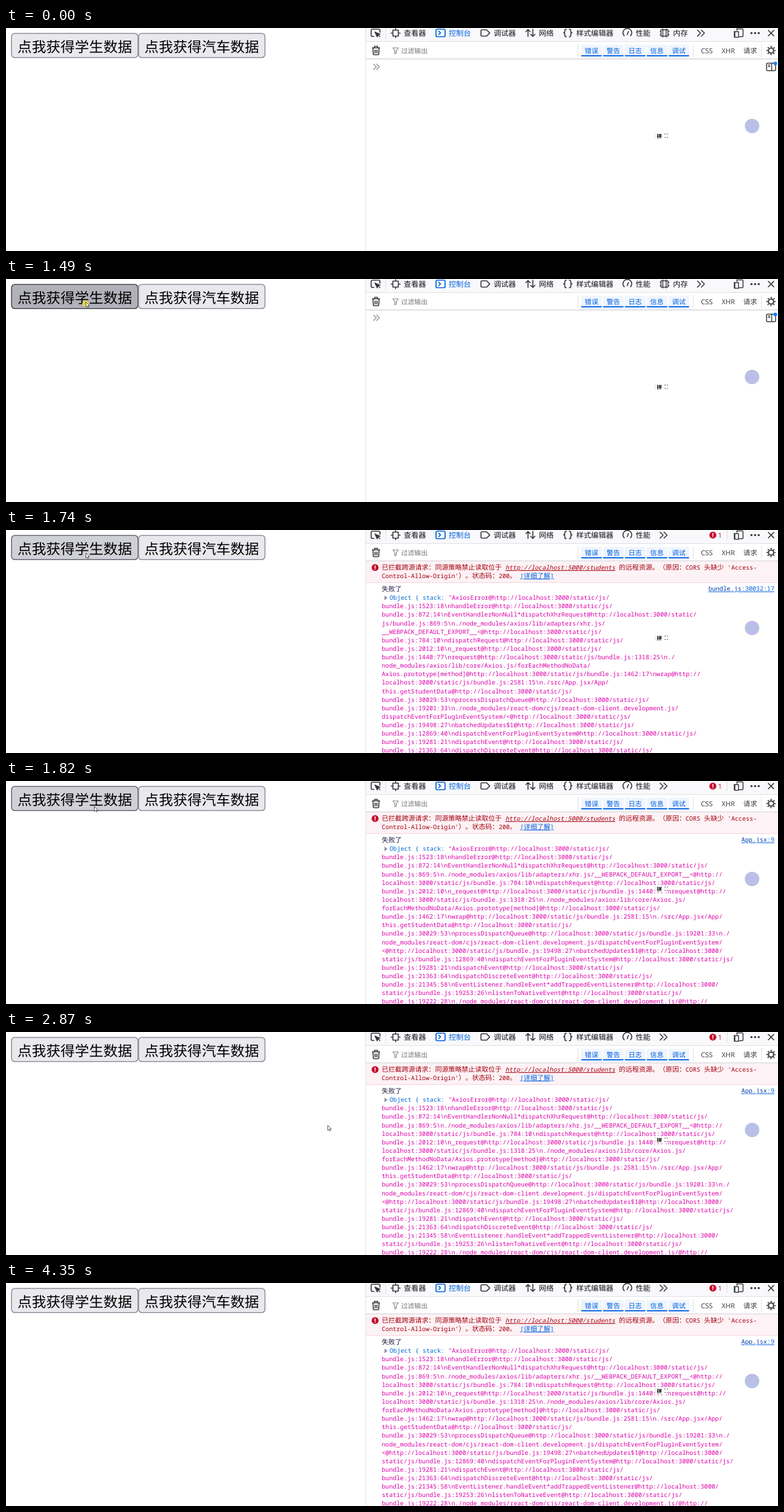
Recreate the animation shown at these times as an HTML page. Size 1280 by 371 pixels, loop 4.44 s.

```html
<!DOCTYPE html>
<html lang="zh-CN">
<head>
<meta charset="utf-8">
<title>控制台</title>
<style>
html, body { margin: 0; width: 100%; height: 100%; overflow: hidden; background: #fff; }
svg { display: block; width: 100%; height: 100%; }
text { white-space: pre; text-rendering: geometricPrecision; text-spacing-trim: space-all; }
.ui { font-family: "Open Sans", "Noto Sans CJK SC", "Noto Sans CJK", sans-serif; }
.mono { font: 500 10.13px "Noto Sans Mono", monospace; }
.cjk { font: 400 11.06px "Noto Sans CJK SC", "Noto Sans CJK", sans-serif; }
.icon { fill: none; stroke: #38383d; stroke-width: 1.7; stroke-linecap: round; stroke-linejoin: round; }
.link { text-decoration: underline; }
</style>
</head>
<body>
<svg viewBox="0 0 1280 371" preserveAspectRatio="none">
  <g id="buttons"></g>

  <rect x="597" width="683" height="22" fill="#f9f9fb"/>
  <path d="M596.5 0V371M597 22.5H1280M629.5 0V19M948.5 27V48M1139.5 27V48M1252.5 27V48" stroke="#e0e0e2"/>
  <path d="M597 51.5H1280" stroke="#d7d7db" stroke-width="1.3"/>

  <g class="icon">
    <path d="M610 14H607.5A2 2 0 0 1 605.5 12V4A2 2 0 0 1 607.5 2H618A2 2 0 0 1 620 4V7"/>
    <path d="M611.5 6.5L620.5 10.3 617 11.5 615.5 15ZM617 11.5L620 14.5" fill="#38383d" stroke-width="1.2"/>
    <path d="M641.5 3.5H650.5V13.5H641.5ZM646 1V3M646 14V16M638.5 8.5H641M651 8.5H653.5"/>
    <path d="M715 2H726A2 2 0 0 1 728 4V12.5A2 2 0 0 1 726 14.5H715A2 2 0 0 1 713 12.5V4A2 2 0 0 1 715 2ZM717.5 5.5L720.5 8.2 717.5 11" stroke="#0060df"/>
    <path d="M789 3H797L802 8.3 797 13.5H789A1.5 1.5 0 0 1 787.5 12V4.500A1.500 1.500 0 0 1 789 3Z"/>
    <path d="M865.500 14V2.500M862 6L865.500 2.500 869 6M873.500 2V14M870 10.500L873.500 14 877 10.500"/>
    <path d="M929 2Q926.500 2 926.500 4.500V6Q926.500 8 924.500 8 926.500 8 926.500 10V12Q926.500 14.500 929 14.500M934 2Q936.500 2 936.500 4.500V6Q936.500 8 938.500 8 936.500 8 936.500 10V12Q936.500 14.500 934 14.500"/>
    <path d="M1025 13A7.300 7.300 0 1 1 1035.500 13M1030 11L1032 6"/>
    <path d="M1207.500 15V5.500M1211.500 1.500H1220.500A1.500 1.500 0 0 1 1222 3V13A1.500 1.500 0 0 1 1220.500 14.500H1216M1212 4V1.500M1208.500 6H1214.500V15.500H1208.500Z" stroke-width="1.500"/>
    <path d="M1236 8.500H1236.100M1242 8.500H1242.100M1248 8.500H1248.100" stroke-width="3.600"/>
    <path d="M1264 4L1273 13M1273 4L1264 13"/>
    <path d="M607.500 33H619.500M611 32.500V30.500H616V32.500M608.500 33.500L609 43A1.500 1.500 0 0 0 610.500 44.500H616.500A1.500 1.500 0 0 0 618 43L618.500 33.500M612 36.500V41.500M615 36.500V41.500"/>
    <path d="M641.500 33H650.500L647.300 37.500V41.500L644.700 43V37.500Z" stroke="#85858c" stroke-width="1.200"/>
    <circle cx="1268.500" cy="37.500" r="4.300" stroke-width="2.100"/>
    <circle cx="1268.500" cy="37.500" r="6.700" stroke-width="2" stroke-linecap="butt" stroke-dasharray="2.100 3.162" stroke-dashoffset="1.050"/>
  </g>
  <g id="labels" class="ui" font-size="12.300" fill="#15141a"></g>
  <g id="filters" class="ui" font-size="11.200"></g>

  <g id="idle">
    <g class="icon">
      <path d="M1086 3H1097.500V13.500H1086ZM1089 1.500V15M1094.500 1.500V15M1084.500 5.500H1086M1084.500 11H1086M1098 5.500H1099.500M1098 11H1099.500" stroke-width="1.400"/>
      <path d="M1146.500 3.500L1151.500 8.500 1146.500 13.500M1153 3.500L1158 8.500 1153 13.500"/>
      <path d="M609.500 60L614 64.500 609.500 69M614.500 60L619 64.500 614.500 69" stroke="#8f8f9d" stroke-width="1.400"/>
      <path d="M1263 58.500H1274A2 2 0 0 1 1276 60.500V69A2 2 0 0 1 1274 71H1263A2 2 0 0 1 1261 69V60.500A2 2 0 0 1 1263 58.500ZM1269.500 58.500V71M1264 61.500H1266.500M1264 64H1266.500"  stroke-width="1.500"/>
    </g>
    <circle cx="1275.500" cy="59" r="3" fill="#0a84ff"/>
    <text class="ui" x="1106" y="12.700" font-size="12.300" fill="#15141a">内存</text>
  </g>

  <g id="logged">
    <path class="icon" d="M1084.500 3.500L1089.500 8.500 1084.500 13.500M1091 3.500L1096 8.500 1091 13.500"/>
    <path d="M1195.500 1V17" stroke="#e0e0e2"/>
    <rect x="597" y="52" width="683" height="35.500" fill="#fdf2f5"/>
    <path d="M597 87.500H1280" stroke="#f8d5dc"/>
    <g id="badges"></g>
    <text class="ui" x="1180.500" y="12.500" font-size="11.500" fill="#c50f2f">1</text>
    <path d="M627.500 109L632.500 113 627.500 117Z" fill="#9292b0"/>
    <g id="messages" class="mono"></g>
    <g id="stack" class="mono" fill="#dd00a9"></g>
  </g>

  <circle cx="1237" cy="163" r="12" fill="#b9bfe6"/>
  <g>
    <rect x="1076" y="174" width="22" height="11" fill="#fff"/>
    <path d="M1076.500 175V185" stroke="#ccc" stroke-dasharray="1 1"/>
    <text class="cjk" x="1079" y="183" style="font-size:8.500px;font-weight:700">拼</text>
    <path d="M1092.500 177.500V176H1094M1095.500 176H1097V177.500M1092.500 181V182.500H1094M1095.500 182.500H1097V181" fill="none" stroke="#555" stroke-width=".8"/>
  </g>

  <circle id="glow" r="5.500" fill="#ffe900" opacity=".6"/>
  <path id="cursor" d="M.5 .5V8.600L2.500 6.900 3.700 9.600 5 9 3.900 6.400H6.500Z" fill="#fff" stroke="#333" stroke-width=".8"/>
</svg>
<script>
const LOOP = 4440, START = 320, STEP = 82.2;
const PRESS = 1490, RELEASE = 1650, LOGGED = 1740, MAPPED = 1820, LAST_CLICK = 4350;
const $ = id => document.getElementById(id);
const esc = s => s.replace(/&/g, '&amp;').replace(/</g, '&lt;');
const wide = s => esc(s).replace(/[^\x00-\x7f]+/g, m => `<tspan class="cjk">${m}</tspan>`);
const text = (x, y, body, attrs = '') => `<text x="${x}" y="${y}" ${attrs}>${body}</text>`;
const span = (body, attrs) => `<tspan ${attrs}>${wide(body)}</tspan>`;

$('buttons').innerHTML = [['点我获得学生数据', 9], ['点我获得汽车数据', 219.6]].map(([label, x]) =>
  `<rect x="${x + .2}" y="9" width="209.6" height="40.2" rx="5.5" stroke-width="1.6" fill="#e9e9ed" stroke="#8f8f9d"/>` +
  text(x + 10, 39.6, label, 'class="ui" font-size="23.75"')).join('');
const button = $('buttons').firstChild;

$('labels').innerHTML = [['查看器', 659.5], ['控制台', 734, '#0060df'], ['调试器', 808.5], ['网络', 883.5],
  ['样式编辑器', 945.5], ['性能', 1044]]
  .map(([s, x, color = '#15141a']) => text(x, 12.7, s, `fill="${color}"`)).join('');

$('filters').innerHTML = text(655, 41.6, '过滤输出', 'fill="#75757e" font-size="11"') +
  ['错误', '警告', '日志', '信息', '调试'].map((s, i) => {
    const x = 953.5 + i * 36.2;
    return `<rect x="${x}" y="28" width="34.5" height="18" rx="2" fill="#f0f5fd"/>` +
      `<rect x="${x}" y="45.3" width="34.5" height="2" rx="1" fill="#0060df"/>` +
      text(x + 17.2, 41.6, s, 'fill="#0060df" text-anchor="middle"');
  }).join('') +
  [['CSS', 1162], ['XHR', 1197.5], ['请求', 1234]]
    .map(([s, x]) => text(x, 41.6, s, 'fill="#38383d" text-anchor="middle" font-size="11.4"')).join('');

$('badges').innerHTML = [[1172, 8.5], [612, 62.5]].map(([x, y]) =>
  `<circle cx="${x}" cy="${y}" r="5.8" fill="#c50f2f"/>` +
  `<path d="M${x} ${y - 3}V${y + .8}M${x} ${y + 2.8}v.1" stroke="#fff" stroke-width="1.6" stroke-linecap="round"/>`).join('');

const RED = 'fill="#a4000f"';
$('messages').innerHTML =
  text(623, 66, wide('已拦截跨源请求：同源策略禁止读取位于 ') +
    span('http://localhost:5000/students', 'class="link" font-style="italic"') +
    wide(" 的远程资源。（原因：CORS 头缺少 'Access-"), RED) +
  text(623, 80, wide("Control-Allow-Origin'）。状态码：200。 ") +
    span('[详细了解]', 'class="link" fill="#0060df"'), RED) +
  text(623, 101.5, wide('失败了'), 'fill="#1a1a40"');

const calls = `AxiosError 1523:18
handleError 872:14
EventHandlerNonNull*dispatchXhrRequest 869:5
./node_modules/axios/lib/adapters/xhr.js/__WEBPACK_DEFAULT_EXPORT__< 784:10
dispatchRequest 2012:10
_request 1440:77
request 1318:25
./node_modules/axios/lib/core/Axios.js/forEachMethodNoData/Axios.prototype[method] 1462:17
wrap 2581:15
./src/App.jsx/App/this.getStudentData 30029:53
processDispatchQueue 19201:33
./node_modules/react-dom/cjs/react-dom-client.development.js/dispatchEventForPluginEventSystem/< 19498:27
batchedUpdates$1 12869:40
dispatchEventForPluginEventSystem 19281:21
dispatchEvent 21363:64
dispatchDiscreteEvent 21345:58
EventListener.handleEvent*addTrappedEventListener 19253:26
listenToNativeEvent 19222:28
./node_modules/react-dom/cjs/react-dom-client.development.js/ 0`;
const trace = calls.split('\n')
  .map(c => c.replace(' ', '@http://localhost:3000/static/js/bundle.js:')).join('\\n');

// Break only after slashes, as the console does.
function wrap(limit) {
  const lines = [''];
  let room = limit - 19;
  for (const part of trace.match(/[^/]*\/+/g)) {
    if (part.length > room) { lines.push(''); room = limit; }
    lines[lines.length - 1] += part;
    room -= part.length;
  }
  return lines.slice(0, 19);
}

function log(limit, file, place) {
  const rows = wrap(limit).map((line, i) => i
    ? text(623, 116.2 + i * 14.12, esc(line))
    : text(636, 115.5, span('Object { stack: ', 'fill="#0067d6"') + '"' + esc(line)));
  const link = span(file, 'fill="#003eaa"') + span(place, 'fill="#0060df"');
  return rows.join('') + text(1274, 101.3, link, 'class="link" fill="#0060df" text-anchor="end"');
}
const logs = [log(87, 'bundle.js', ':30032:17'), log(96, 'App.jsx', ':9')];

// Pointer waypoints: step, x, y, easing power (0 = smooth both ways).
const route = [[0, 1190, 364], [6, 116, 100, 2], [8, 138, 59, 1], [12, 132, 38, 2], [17, 132, 38, 1],
  [18, 146, 42, 1], [20, 383, 99, 1], [27, 534, 156, 2], [30, 533, 156, 1], [31, 533, 155, 1],
  [33, 533, 155, 1], [40, 1159, 354, 0], [43, 1241, 368, 1.5], [44, 1263, 372.5, 1], [60, 1263, 372.5, 1]];

function pointer(n) {
  const i = route.findIndex(p => p[0] > n), [n0, x0, y0] = route[i - 1], [n1, x1, y1, power] = route[i];
  const k = (n - n0) / (n1 - n0);
  const e = power ? 1 - (1 - k) ** power : k * k * (3 - 2 * k);
  return [x0 + (x1 - x0) * e, y0 + (y1 - y0) * e];
}

const show = (el, on) => el.setAttribute('visibility', on ? 'visible' : 'hidden');
let shown = -1;

function draw(t) {
  const step = Math.floor((t - START) / STEP);
  const [x, y] = step < 0 ? [1263, 372.5] : pointer(step);
  const pressed = t >= PRESS && t < RELEASE;
  const hover = x > 9 && x < 219 && y > 8 && y < 50;
  const [fill, stroke] = pressed ? ['#b1b1b9', '#484851'] : hover ? ['#d0d0d7', '#676774'] : ['#e9e9ed', '#8f8f9d'];
  button.setAttribute('fill', fill);
  button.setAttribute('stroke', stroke);

  show($('idle'), t < LOGGED);
  show($('logged'), t >= LOGGED);
  const version = t >= MAPPED ? 1 : 0;
  if (version !== shown) $('stack').innerHTML = logs[shown = version];

  const place = `translate(${x} ${y})`;
  $('cursor').setAttribute('transform', place);
  $('glow').setAttribute('transform', place + ' translate(0 3)');
  show($('cursor'), step >= 0 && step < 44);
  show($('glow'), pressed || t >= LAST_CLICK);
}

const begin = performance.now();
function tick() {
  draw((performance.now() - begin) % LOOP);
  requestAnimationFrame(tick);
}
tick();
</script>
</body>
</html>
```
